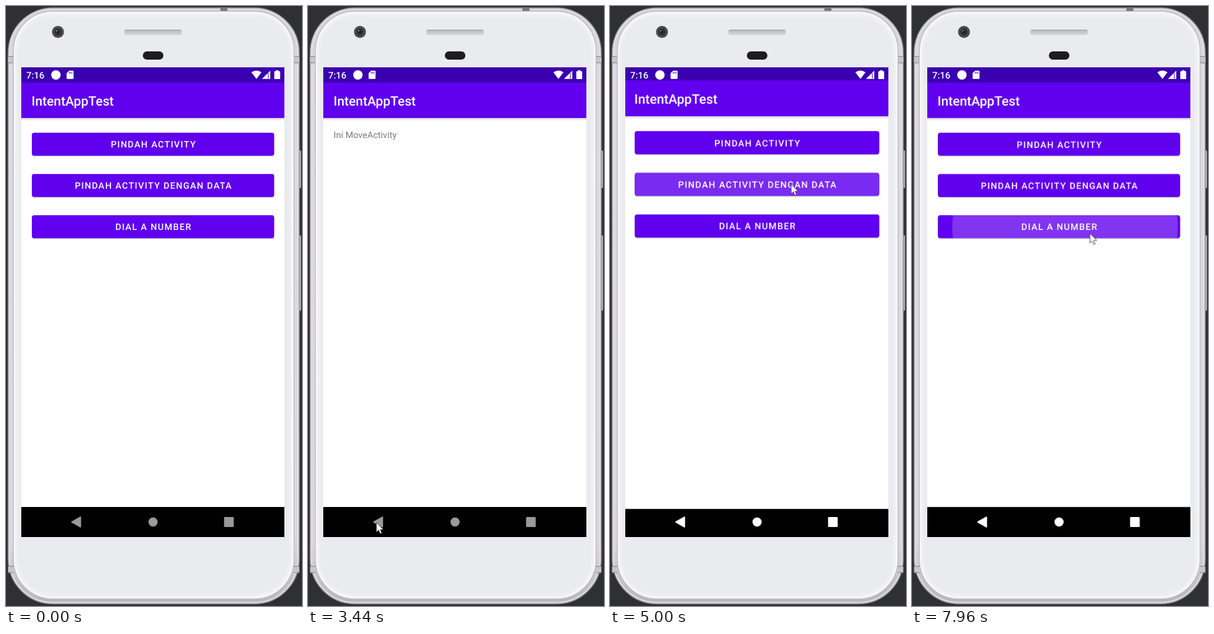
Recreate the animation shown at these times as an HTML page. Size 504x1018 px, loop 8000 ms.

```html
<!DOCTYPE html>
<html lang="id">
<head>
<meta charset="utf-8">
<title>IntentAppTest</title>
<style>
html, body { margin: 0; width: 100%; height: 100%; overflow: hidden; background: #2f3034; }
svg { display: block; width: 100%; height: 100%; }
text { font-family: Roboto, "Noto Sans", sans-serif; text-rendering: geometricPrecision; }
.title { font-size: 22.2px; font-weight: 500; fill: #fff; }
.label { font-size: 15.26px; font-weight: 500; letter-spacing: 1.36px; text-anchor: middle; fill: #fff; }
.body { font-size: 15.26px; fill: #7a7a7a; }
.clock { font-size: 15.6px; font-weight: 500; fill: #fff; }

.main, .move, .data, .rip, .pill, .nav, .cursor { animation: 8s linear infinite; }
.main, .move, .data { transform-origin: 250px 502px; }
.rip { transform-box: fill-box; transform-origin: center; fill: #fff; opacity: 0; }
.main { animation-name: main; }
.move { animation-name: move; }
.data { animation-name: data; }
.rip1 { animation-name: rip1; }
.rip2 { animation-name: rip2; }
.rip3 { animation-name: rip3; }
.pill { animation-name: pill; fill: #fff; }
.nav { animation-name: nav; }
.cursor { animation-name: cursor; }

/* Each window change lasts 400 ms on a two-part curve. */
@keyframes main {
  0% { transform: none; }
  22.5% { transform: scale(1); animation-timing-function: cubic-bezier(.3,0,.8,.15); }
  23.333% { transform: scale(1.06); animation-timing-function: cubic-bezier(.05,.7,.1,1); }
  27.5%, 47.624% { transform: scale(1.15); }
  47.625% { transform: scale(1.1); animation-timing-function: cubic-bezier(.3,0,.8,.15); }
  48.458% { transform: scale(1.06); animation-timing-function: cubic-bezier(.05,.7,.1,1); }
  52.625% { transform: scale(1); }
  62.0875% { transform: scale(1); animation-timing-function: cubic-bezier(.3,0,.8,.15); }
  62.921% { transform: scale(1.06); animation-timing-function: cubic-bezier(.05,.7,.1,1); }
  67.0875%, 85.299% { transform: scale(1.15); }
  85.3% { transform: scale(1.1); animation-timing-function: cubic-bezier(.3,0,.8,.15); }
  86.133% { transform: scale(1.06); animation-timing-function: cubic-bezier(.05,.7,.1,1); }
  90.3%, 100% { transform: scale(1); }
}
@keyframes move {
  0%, 23.125% { opacity: 0; }
  23.75%, 48.0625% { opacity: 1; }
  48.6875%, 100% { opacity: 0; }
  0% { transform: scale(.85); }
  22.5% { transform: scale(.85); animation-timing-function: cubic-bezier(.3,0,.8,.15); }
  23.333% { transform: scale(.91); animation-timing-function: cubic-bezier(.05,.7,.1,1); }
  27.5% { transform: scale(1); }
  47.625% { transform: scale(1); animation-timing-function: cubic-bezier(.3,0,.8,.15); }
  48.458% { transform: scale(.96); animation-timing-function: cubic-bezier(.05,.7,.1,1); }
  52.625%, 100% { transform: scale(.9); }
}
@keyframes data {
  0%, 62.7125% { opacity: 0; }
  63.3375%, 85.7375% { opacity: 1; }
  86.3625%, 100% { opacity: 0; }
  0% { transform: scale(.85); }
  62.0875% { transform: scale(.85); animation-timing-function: cubic-bezier(.3,0,.8,.15); }
  62.921% { transform: scale(.91); animation-timing-function: cubic-bezier(.05,.7,.1,1); }
  67.0875% { transform: scale(1); }
  85.3% { transform: scale(1); animation-timing-function: cubic-bezier(.3,0,.8,.15); }
  86.133% { transform: scale(.96); animation-timing-function: cubic-bezier(.05,.7,.1,1); }
  90.3%, 100% { transform: scale(.9); }
}
@keyframes rip1 {
  0%, 21% { opacity: 0; }
  22%, 24% { opacity: .2; }
  27%, 100% { opacity: 0; }
  0%, 21% { transform: translate(-54px) scale(.6); }
  24%, 100% { transform: none; }
}
@keyframes rip2 {
  0%, 59.5% { opacity: 0; }
  60.5%, 63% { opacity: .17; }
  66%, 100% { opacity: 0; }
  0%, 59.5% { transform: translate(58px) scale(.6); }
  62.3%, 100% { transform: none; }
}
@keyframes rip3 {
  0%, 98% { opacity: 0; }
  98.9%, 100% { opacity: .21; }
  0% { transform: translate(53px) scale(.6); }
  98% { transform: translate(53px) scale(.6); animation-timing-function: cubic-bezier(.4,0,.2,1); }
  100% { transform: translate(8.6px) scale(.94); }
}
@keyframes pill {
  0%, 46% { opacity: 0; }
  47%, 49% { opacity: .08; }
  51.5%, 84% { opacity: 0; }
  85%, 87% { opacity: .09; }
  89.5%, 100% { opacity: 0; }
}
@keyframes nav {
  0%, 46% { fill: #9a9a9a; }
  46.8%, 100% { fill: #fff; }
}
@keyframes cursor {
  0% { transform: translate(330px, 1030px); }
  15.4% { transform: translate(330px, 1030px); animation-timing-function: cubic-bezier(.2,.4,.3,1); }
  20.5%, 26.5% { transform: translate(196px, 232px); animation-timing-function: ease-in-out; }
  29.2%, 30% { transform: translate(187px, 208px); animation-timing-function: ease-in; }
  36.5% { transform: translate(135px, 584px); animation-timing-function: ease-out; }
  40.5%, 46% { transform: translate(116px, 876px); animation-timing-function: ease-in-out; }
  49% { transform: translate(338px, 418px); animation-timing-function: ease-out; }
  53% { transform: translate(312px, 310px); animation-timing-function: ease-out; }
  58%, 63.5% { transform: translate(308px, 302px); animation-timing-function: ease-in-out; }
  71% { transform: translate(164px, 236px); animation-timing-function: ease-out; }
  73.5%, 76% { transform: translate(133px, 253px); animation-timing-function: ease-in-out; }
  82.5%, 87% { transform: translate(113px, 878px); animation-timing-function: ease-in-out; }
  96.5%, 100% { transform: translate(302.5px, 385.5px); }
}
</style>
</head>
<body>
<svg viewBox="0 0 504 1018" preserveAspectRatio="none">
  <defs>
    <linearGradient id="fade" x2="0" y2="1">
      <stop stop-color="#000" stop-opacity=".16"/>
      <stop offset="1" stop-color="#000" stop-opacity="0"/>
    </linearGradient>
    <linearGradient id="slot" x2="0" y2="1">
      <stop stop-color="#a5a6aa"/>
      <stop offset=".4" stop-color="#c6c7ca"/>
      <stop offset="1" stop-color="#d3d3d6"/>
    </linearGradient>
    <linearGradient id="key">
      <stop stop-color="#a6a6aa"/>
      <stop offset=".5" stop-color="#dcdbdf"/>
      <stop offset="1" stop-color="#8f8f94"/>
    </linearGradient>
    <linearGradient id="rim" x2="0" y2="1">
      <stop stop-color="#d2d0d4"/>
      <stop offset=".1" stop-color="#dcdade"/>
      <stop offset=".9" stop-color="#dad8dc"/>
      <stop offset="1" stop-color="#b9b7bb"/>
    </linearGradient>
    <clipPath id="screen"><rect x="26" y="104" width="448" height="797"/></clipPath>
    <clipPath id="b1"><rect x="44" y="215" width="412.6" height="39" rx="4"/></clipPath>
    <clipPath id="b2"><rect x="44" y="285" width="412.6" height="39" rx="4"/></clipPath>
    <clipPath id="b3"><rect x="44" y="355" width="412.6" height="39" rx="4"/></clipPath>
    <!-- bleeds past the screen so nothing shows behind a settling window -->
    <g id="win">
      <rect x="24" y="102" width="452" height="801" fill="#fff"/>
      <rect x="24" y="190" width="452" height="5" fill="url(#fade)"/>
      <rect x="24" y="102" width="452" height="88" fill="#6000ee"/>
      <rect x="24" y="102" width="452" height="27.8" fill="#3a00b0"/>
      <rect x="24" y="850" width="452" height="53"/>
      <text class="title" x="43.4" y="168.6">IntentAppTest</text>
    </g>
    <g id="btn">
      <rect x="44" y="1.8" width="412.6" height="39" rx="4" fill="#000" opacity=".1"/>
      <rect x="44.3" y="1" width="412" height="39" rx="4" fill="#000" opacity=".13"/>
      <rect x="44" width="412.6" height="39" rx="4" fill="#6000ee"/>
    </g>
    <g id="seam" fill="#8f8e93">
      <rect x="3.5" width="9.5" height="1.6"/>
      <rect x="3.5" y="10.5" width="9.5" height="1.6"/>
      <rect x="3.5" y="1.6" width="9.5" height="8.9" fill="#c8c7cb"/>
    </g>
  </defs>

  <!-- phone -->
  <rect width="504" height="1018" fill="#2f3034"/>
  <rect x="498" y="245" width="4.5" height="64" rx="2" fill="url(#key)"/>
  <rect x="498" y="389" width="4.5" height="128" rx="2" fill="url(#key)"/>
  <rect x="3.5" y="3" width="496" height="1011.5" rx="76" fill="#cbc9ce" stroke="#85848a" stroke-width="1.4"/>
  <rect x="6" y="5.5" width="491" height="1006" rx="73" fill="url(#rim)" stroke="#ebe9ec" stroke-width="1.2"/>
  <use href="#seam" y="85"/>
  <use href="#seam" x="486.5" y="85"/>
  <use href="#seam" y="950"/>
  <use href="#seam" x="486.5" y="950"/>
  <rect x="365" y="3.5" width="12" height="5" rx="1" fill="#75747a"/>
  <rect x="12.5" y="9" width="478" height="997" rx="67" fill="#f5f5f7" stroke="#b6b4b9" stroke-width="1.2"/>
  <rect x="17" y="14" width="469" height="987" rx="62" fill="#efeff2"/>
  <rect x="21" y="18" width="461" height="979" rx="58" fill="#eaebee"/>
  <circle cx="88.5" cy="44" r="10.2" fill="#47464c"/>
  <circle cx="88.5" cy="44" r="7" fill="#2b2a30" stroke="#66656b"/>
  <circle cx="88.5" cy="44" r="3.2" fill="#17161b" stroke="#504f56"/>
  <circle cx="86.6" cy="42" r="1.2" fill="#8b8a91"/>
  <rect x="201.5" y="40" width="98" height="9" rx="4" fill="url(#slot)"/>
  <rect x="233" y="77" width="35" height="14" rx="7" fill="#1e1c21"/>

  <g clip-path="url(#screen)">
    <g class="main">
      <use href="#win"/>
      <use href="#btn" y="215"/>
      <use href="#btn" y="285"/>
      <use href="#btn" y="355"/>
      <g clip-path="url(#b1)"><circle class="rip rip1" cx="250.3" cy="234.5" r="207"/></g>
      <g clip-path="url(#b2)"><circle class="rip rip2" cx="250.3" cy="304.5" r="207"/></g>
      <g clip-path="url(#b3)"><circle class="rip rip3" cx="250.3" cy="374.5" r="207"/></g>
      <text class="label" x="251.3" y="240.4">PINDAH ACTIVITY</text>
      <text class="label" x="251.3" y="310.2">PINDAH ACTIVITY DENGAN DATA</text>
      <text class="label" x="251.3" y="380.2">DIAL A NUMBER</text>
    </g>
    <g class="move">
      <use href="#win"/>
      <text class="body" x="43.6" y="224.4">Ini MoveActivity</text>
    </g>
    <g class="data">
      <use href="#win"/>
      <text class="body" x="43.6" y="224.4">Name : Gordon Valderonius Hamsey</text>
      <text class="body" x="43.6" y="242.3">Age : 19</text>
    </g>

    <!-- status bar -->
    <text class="clock" x="34.6" y="122.6">7:16</text>
    <g fill="#fff">
      <circle cx="85" cy="117" r="8"/>
      <path d="M107.5 109.8h6.3q1.2 0 1.2 1.2v11.6q0 1.2-1.2 1.2h-9.4q-1.2 0-1.2-1.2v-8.5z"/>
      <path d="M417.8 112.6q8.6-6.2 17.2 0l-8.6 11.2z"/>
      <path d="M450 109.8v14h-14.2z"/>
      <path d="M459.8 109h4v1.5h2q1 0 1 1v11.4q0 1-1 1h-8q-1 0-1-1v-11.4q0-1 1-1h2z"/>
    </g>
    <path d="M107.6 111.8v3M110 111.8v3M112.4 111.8v3" stroke="#3a00b0" stroke-width="1.1"/>
    <path d="M446.6 114v9" stroke="#3a00b0" stroke-width="1"/>

    <!-- navigation bar -->
    <rect class="pill" x="63" y="850" width="116" height="51.5" rx="22" opacity="0"/>
    <g class="nav" fill="#9a9a9a">
      <path d="M111.8 874.6 126 866.5q1.8-.8 1.8 1.1v15.8q0 1.9-1.8 1.1L111.8 876.4q-1.4-.9 0-1.8z"/>
      <circle cx="250.4" cy="875.5" r="7.8"/>
      <rect x="371.3" y="867" width="16.4" height="17" rx="1.5"/>
    </g>
  </g>

  <path class="cursor" d="M.5.5v16.2l3.8-3.5 2.6 6 2.7-1.2-2.6-5.8h5.2z" fill="#fff" stroke="#4a4a4e" stroke-width="1" stroke-linejoin="round"/>
</svg>
</body>
</html>
```
